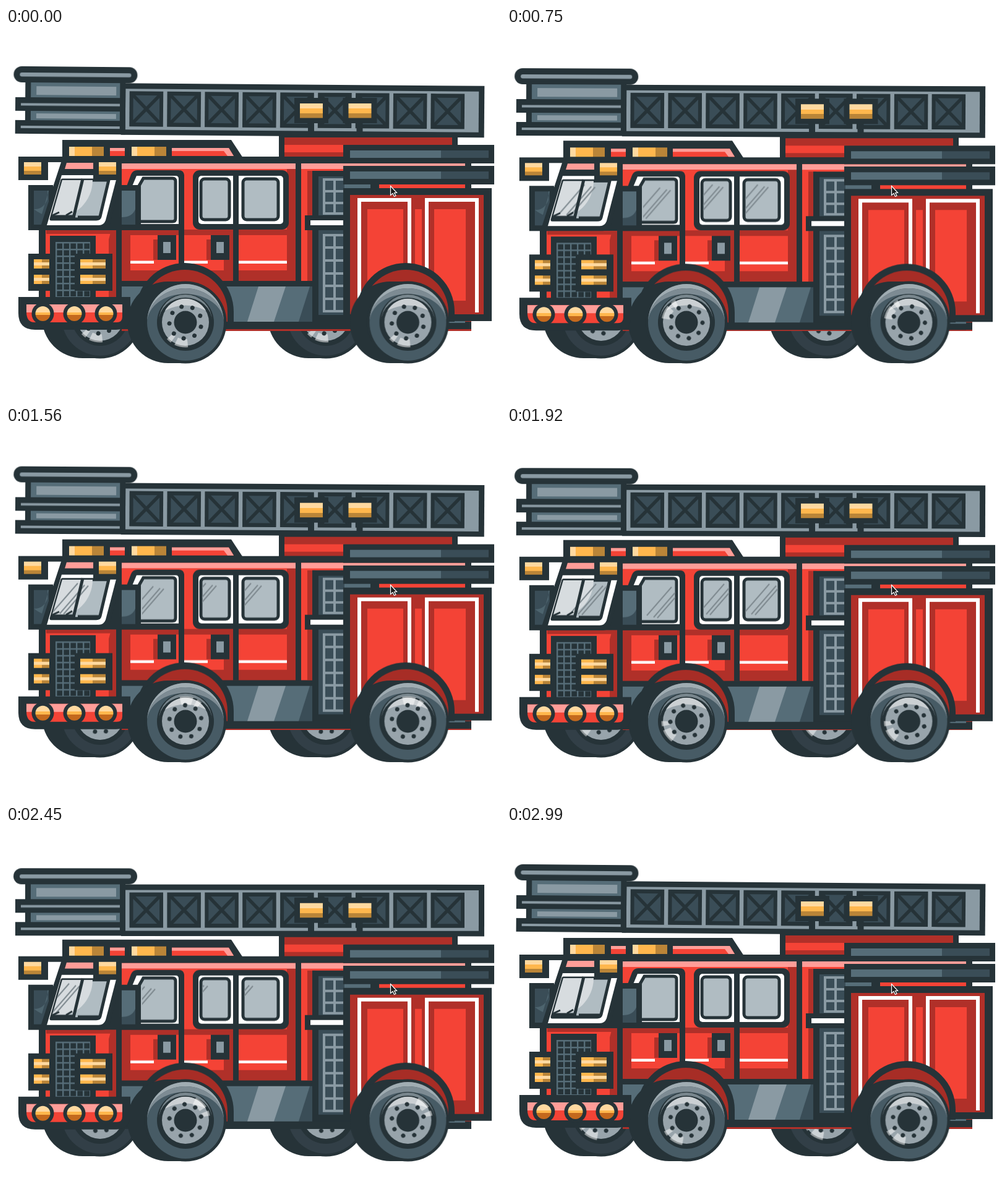
These frames come from a looping animation (800 by 600 pixels, 3.09 s). An HTML page without scripts:

```html
<!DOCTYPE html>
<html lang="en">
<head>
<meta charset="utf-8">
<title>Fire engine</title>
<style>
@property --lift { syntax: '<number>'; inherits: true; initial-value: 0; }
html, body { margin: 0; width: 100%; height: 100%; overflow: hidden; background: #fff; }
svg { display: block; width: 100vw; height: 100vh; animation: bump 3090ms ease-in-out infinite; }
.body { transform: translateY(calc(min(var(--lift), 1.3) * -3px)); }
.ladder {
  transform-origin: 773px 136px;
  transform: translateY(calc(var(--lift) * -1.2px)) rotate(calc(var(--lift) * .45deg));
}
.spin { animation: spin 3090ms linear infinite; }
.shine { animation: sweep 3090ms linear infinite; stroke: #7f8a90; stroke-width: 2; fill: none; }

.k { fill: #263338; }
.r { fill: #f44336; }
.d { fill: #b03029; }
.p { fill: #ff9d98; }
.g { fill: #8a9aa3; }
.s { fill: #566d78; }
.n { fill: #3a4d57; }
.w { fill: #fff; }
.a { fill: url(#rows); }
.glass { fill: #b0bcc2; stroke: #263338; stroke-width: 5; }

@keyframes bump {
  0%, 2.9%, 96.8%, 100% { --lift: 1; }
  7%, 15.5%, 18.4% { --lift: 0; }
  22% { --lift: 1; }
  27% { --lift: 0; }
  32.3% { --lift: 1; }
  35.9%, 38.8% { --lift: 0; }
  44% { --lift: 2.8; }
  47.3% { --lift: -.6; }
  50.5%, 53.4% { --lift: .78; }
  57.5% { --lift: 0; }
  62.1%, 65% { --lift: .4; }
  67% { --lift: 1; }
  72% { --lift: 0; }
  79.3%, 82.2% { --lift: .1; }
  86% { --lift: 1; }
  91% { --lift: 0; }
}
@keyframes spin {
  0%, 1.5% { transform: rotate(0deg); }
  98.2%, 100% { transform: rotate(-1080deg); }
}
@keyframes sweep {
  0%, 2.9%, 32.4%, 38.8%, 66.1%, 70%, 96.8%, 100% { transform: translateX(-95px); }
  12% { transform: translateX(-50px); }
  15.5%, 18.4% { transform: translateX(-38px); }
  30%, 62.1%, 65%, 94% { transform: translateX(0); }
  32.3%, 66%, 96.7% { transform: translateX(90px); }
  47% { transform: translateX(-42px); }
  50.5%, 53.4% { transform: translateX(-28px); }
  79.3%, 82.2% { transform: translateX(-42px); }
}
</style>
</head>
<body>
<svg viewBox="0 0 800 600">
<defs>
  <linearGradient id="rows" x2="0" y2="1">
    <stop offset=".36" stop-color="#ffd9a0"/><stop offset=".36" stop-color="#ffb74d"/>
    <stop offset=".68" stop-color="#ffb74d"/><stop offset=".68" stop-color="#ba8538"/>
  </linearGradient>
  <linearGradient id="cols">
    <stop offset=".16" stop-color="#ffd9a0"/><stop offset=".16" stop-color="#ffb74d"/>
    <stop offset=".66" stop-color="#ffb74d"/><stop offset=".66" stop-color="#ba8538"/>
  </linearGradient>
  <linearGradient id="halves">
    <stop offset=".5" stop-color="#ffb74d"/><stop offset=".5" stop-color="#ba8538"/>
  </linearGradient>
  <linearGradient id="bulb" x2="0" y2="1">
    <stop offset=".4" stop-color="#ffd9a0"/><stop offset=".4" stop-color="#ffb74d"/>
    <stop offset=".6" stop-color="#ffb74d"/><stop offset=".6" stop-color="#c4691d"/>
  </linearGradient>
  <pattern id="mesh" width="11" height="11" x="80" y="349" patternUnits="userSpaceOnUse">
    <path d="M0 1.2H11M1.2 0V11" stroke="#566d78" stroke-width="2.4"/>
  </pattern>
  <clipPath id="c0"><path d="M91 249H166L152 308H74Z"/></clipPath>
  <clipPath id="c1"><rect x="220" y="248" width="52" height="66" rx="4"/></clipPath>
  <clipPath id="c2"><rect x="317" y="249" width="42" height="62" rx="4"/></clipPath>
  <clipPath id="c3"><rect x="385" y="249" width="53" height="62" rx="4"/></clipPath>

  <path id="streaks" d="M-24 22L16 -24M-13 25L27 -21M-7 26L33 -20"/>
  <g id="cell">
    <rect class="k" width="54.5" height="57"/>
    <rect class="n" x="6" y="6.5" width="42.5" height="44"/>
    <path d="M6 6.5L48.5 50.5M48.5 6.5L6 50.5" stroke="#263338" stroke-width="5.5"/>
  </g>
  <g id="beacon">
    <rect class="k" x="-9" y="-9" width="55" height="41"/>
    <rect class="k" x="13" y="30" width="10" height="17"/>
    <rect class="a" width="37" height="23.5"/>
  </g>
  <g id="handle">
    <rect class="d" x="-7" y="7" width="9" height="33"/>
    <rect class="k" width="30" height="40"/>
    <rect class="g" x="9" y="11" width="12" height="18"/>
  </g>
  <g id="foglamp">
    <circle class="k" r="18"/><circle r="12" fill="url(#bulb)"/>
  </g>
  <g id="pipe">
    <rect class="k" width="244" height="30"/>
    <rect class="s" x="11" y="9" width="147" height="12"/>
    <rect class="n" x="158" y="9" width="77" height="12"/>
  </g>
  <g id="fender">
    <path class="k" d="M-79 16V0A79 79 0 0 1 79 0V16Z"/>
    <path d="M-69 16V0A69 68 0 0 1 69 0V16Z" fill="#a72d26"/>
    <path class="k" d="M-70 16V0Q-66 -36 -38 -46L-20 16Z"/>
  </g>
  <g id="wheel">
    <path class="k" d="M-28 -66H0V66H-28A66 66 0 0 1 -28 -66Z"/>
    <circle class="k" r="66.5"/>
    <circle r="62" fill="currentColor"/>
    <path d="M-62 0A62 62 0 0 1 62 0A62 55 0 0 0 -62 0Z" fill="#a0acb2"/>
    <path d="M-62 0A62 55 0 0 1 62 0A62 46 0 0 0 -62 0Z" fill="#7d8b93"/>
    <circle class="k" r="46"/>
    <path d="M-43 -2A43 43 0 0 1 43 -2A43 38 0 0 0 -43 -2Z" fill="#78868d"/>
    <circle r="38" fill="#98a4ab"/>
    <path d="M-33 -19A38 38 0 0 1 33 -19Q0 -36 -33 -19Z" fill="#cbd0d3"/>
    <circle class="k" r="18.5"/>
  </g>
  <g id="hub" fill="none">
    <circle r="34" stroke="#fff" stroke-opacity=".5" stroke-width="13" pathLength="360" stroke-dasharray="32 10 12 306" transform="rotate(84)"/>
    <circle r="26" stroke="#263338" stroke-width="7" stroke-linecap="round" pathLength="9" stroke-dasharray="0 1" transform="rotate(16)"/>
  </g>
</defs>

<g color="#323f47">
  <g transform="translate(152 468)"><use href="#wheel"/><use href="#hub" class="spin"/></g>
  <g transform="translate(517 468)"><use href="#wheel"/><use href="#hub" class="spin"/></g>
</g>
<rect class="d" x="187" y="466" width="565" height="24"/>

<g class="body">
  <!-- turret and roof lights -->
  <path class="k" d="M441 176H730V200H721V215H441Z"/>
  <rect class="d" x="450" y="180" width="271" height="13"/>
  <rect class="r" x="450" y="192" width="97" height="13"/>
  <rect class="d" x="450" y="204" width="97" height="7"/>
  <path class="k" d="M91 184H364L383 213H91Z"/>
  <rect x="102" y="195" width="56" height="15" fill="url(#cols)"/>
  <rect x="203" y="195" width="56" height="15" fill="url(#cols)"/>
  <rect class="r" x="168" y="197" width="24" height="13"/>
  <rect class="p" x="168" y="197" width="24" height="5"/>
  <path class="r" d="M268 197H360L368 210H268Z"/>
  <path class="p" d="M268 197H360L368 210H358L352 202H268Z"/>

  <!-- shell -->
  <path class="k" d="M92 211H752V266H742V490H187V445H53V330Z"/>
  <rect class="d" x="187" y="222" width="281" height="190"/>
  <rect class="p" x="187" y="222" width="281" height="9"/>
  <rect class="r" x="187" y="231" width="267" height="98"/>
  <rect class="r" x="477" y="222" width="265" height="190"/>
  <rect class="p" x="477" y="222" width="265" height="9"/>
  <path class="d" d="M487 234H500V412H487Z"/>

  <!-- cab front -->
  <rect class="k" x="36" y="257" width="40" height="73"/>
  <rect class="n" x="45" y="266" width="24" height="55"/>
  <path class="s" d="M45 296Q60 297 67 280V266H69L58 304Q50 300 45 296Z" opacity=".7"/>
  <path class="p" d="M98 221H178V231H95Z"/>
  <path class="r" d="M64 330H178V440H64Z"/>
  <path class="d" d="M170 330H178V440H166V345Z"/>
  <rect class="d" x="65" y="330" width="105" height="6"/>
  <path class="k" d="M86 231H187V246L168 320Q165 330 155 330H54Z"/>
  <path class="w" d="M90 241H180L161 314Q158 322 150 322H66Z"/>
  <path class="glass" stroke-linejoin="round" d="M91 249H166L152 308Q151 312 146 312H73Z"/>
  <g clip-path="url(#c0)">
    <circle cx="79" cy="249" r="61" fill="#d7dcdf"/>
    <g transform="translate(128 279)"><use href="#streaks" class="shine"/></g>
  </g>
  <path d="M124 247L109 310M73 308H112M116 309H150" fill="none" stroke="#263338" stroke-width="5"/>
  <path d="M75 306L86 301M97 306L107 300" stroke="#263338" stroke-width="3"/>
  <rect class="k" x="178" y="231" width="9" height="210"/>
  <rect class="k" x="71" y="339" width="74" height="104"/>
  <rect x="80" y="349" width="56" height="91" fill="url(#mesh)"/>
  <path class="k" d="M36 368H79V428H36ZM111 368H172V428H111Z"/>
  <path d="M45 377H70V392H45ZM45 402H70V417H45Z" fill="url(#halves)"/>
  <path d="M120 377H161V392H120ZM120 402H161V417H120Z" fill="url(#halves)"/>
  <path d="M45 382H70V387H45ZM45 407H70V412H45ZM120 382H161V387H120ZM120 407H161V412H120Z" fill="#ffd9a0"/>
  <path class="k" d="M20 211H100V220H68V249H20ZM141 211H187V249H141Z"/>
  <rect class="a" x="29" y="220" width="28" height="20"/>
  <rect class="a" x="150" y="220" width="28" height="20"/>

  <!-- doors -->
  <path class="r" d="M201 338H279V395H201ZM288 338H352V395H288ZM376 338H454V395H376Z"/>
  <path class="w" d="M201 379.5H239V384H201ZM288 379.5H326V384H288ZM376 379.5H454V384H376Z"/>
  <path class="k" d="M279 240H288V412H279ZM367 320H376V412H367ZM468 213H477V412H468Z"/>
  <path class="k" d="M202 240Q205 233 212 233H279Q288 233 288 242V330H187V280Z"/>
  <path class="w" d="M211 242H274Q279 242 279 247V320H200V268Z"/>
  <path class="glass" d="M222 246H269Q274 246 274 251V311Q274 316 269 316H214V260Z"/>
  <g clip-path="url(#c1)"><g transform="translate(250 284)"><use href="#streaks" class="shine"/></g></g>
  <rect class="k" x="302" y="233" width="155" height="96" rx="11"/>
  <rect class="w" x="311" y="242" width="137" height="78" rx="5"/>
  <rect class="k" x="367" y="236" width="9" height="90"/>
  <rect class="glass" x="315" y="247" width="46" height="66" rx="6"/>
  <rect class="glass" x="383" y="247" width="57" height="66" rx="6"/>
  <g clip-path="url(#c2)"><g transform="translate(335 279)"><use href="#streaks" class="shine"/></g></g>
  <g clip-path="url(#c3)"><g transform="translate(408 279)"><use href="#streaks" class="shine"/></g></g>
  <rect class="k" x="178" y="257" width="40" height="73"/>
  <rect class="n" x="187" y="266" width="22" height="55"/>
  <path class="s" d="M187 266H209V296Q204 309 187 309Z"/>
  <use href="#handle" x="245" y="338"/>
  <use href="#handle" x="331" y="338"/>

  <!-- side skirt -->
  <rect class="k" x="187" y="412" width="310" height="10"/>
  <rect class="s" x="187" y="421" width="308" height="57"/>
  <path class="g" d="M408 421H452L433 478H390Z"/>
  <path class="n" d="M491 421H495V478H473Z"/>
  <path class="k" d="M187 478H752V490H187Z"/>
  <rect class="s" x="715" y="476" width="27" height="4"/>

  <!-- equipment column -->
  <rect class="k" x="495" y="234" width="60" height="243"/>
  <path class="n" d="M505 243H547V306H505ZM505 330H547V467H505Z"/>
  <path d="M514 246V305M531 246V305M512 248H547M512 267H547M512 286H547M512 303H547M514 336V463M531 336V463M512 338H547M512 358H547M512 379H547M512 400H547M512 420H547M512 441H547M512 461H547" stroke="#8a9aa3" stroke-width="4"/>
  <rect class="k" x="483" y="306" width="70" height="24"/>
  <rect class="w" x="492" y="314" width="55" height="8"/>

  <!-- rear locker -->
  <rect class="k" x="547" y="252" width="205" height="14"/>
  <rect class="s" x="547" y="255" width="42" height="7"/>
  <rect class="r" x="603" y="255" width="139" height="7"/>
  <rect class="k" x="545" y="262" width="240" height="215"/>
  <rect class="d" x="556" y="273" width="216" height="193"/>
  <path class="r" d="M584 296H642V460H584ZM661 296H672V460H661ZM692 296H743V444H692ZM568 300H574V466H568Z"/>
  <path d="M571 466V281H652V440M680 440V281H761V463" fill="none" stroke="#fff" stroke-width="6"/>
  <use href="#pipe" x="545" y="192"/>
  <use href="#pipe" x="545" y="226"/>
  <use href="#fender" x="289" y="462"/>
  <use href="#fender" x="646" y="462"/>
</g>

<g class="ladder">
  <rect class="k" x="186" y="95" width="587" height="83.5"/>
  <rect class="g" x="193" y="104" width="571" height="66"/>
  <use href="#cell" x="199.5" y="108"/><use href="#cell" x="260.4" y="108"/>
  <use href="#cell" x="321.3" y="108"/><use href="#cell" x="382.2" y="108"/>
  <use href="#cell" x="443.1" y="108"/><use href="#cell" x="504" y="108"/>
  <use href="#cell" x="564.9" y="108"/><use href="#cell" x="625.8" y="108"/>
  <use href="#cell" x="686.5" y="108"/>
  <path class="k" d="M31 90H193V178H15V156H31V141H15V119H31Z"/>
  <path class="s" d="M40 95H184V119H40ZM40 141H184V156H40Z"/>
  <path class="g" d="M49 101H178V115H49ZM49 145H178V153H49ZM24 128.5H184V132.5H24ZM24 165H184V169H24Z"/>
  <rect class="k" x="12" y="69" width="200" height="26" rx="13"/>
  <rect class="g" x="22" y="79" width="180" height="6.5" rx="3.2"/>
</g>

<g class="body">
  <use href="#beacon" x="475" y="125"/>
  <use href="#beacon" x="553.5" y="125"/>
</g>

<g color="#475b65">
  <g transform="translate(290 476)"><use href="#wheel"/><use href="#hub" class="spin"/></g>
  <g transform="translate(649.5 476)"><use href="#wheel"/><use href="#hub" class="spin"/></g>
</g>

<g class="body">
  <path class="k" d="M20 438H201V466Q201 491 178 491H47Q20 491 20 464Z"/>
  <path class="r" d="M33 450H188V470Q188 479 179 479H46Q33 479 33 462Z"/>
  <path class="p" d="M33 450H188V463H33Z"/>
  <use href="#foglamp" x="59.5" y="465"/>
  <use href="#foglamp" x="110.5" y="465"/>
  <use href="#foglamp" x="161.5" y="465"/>
</g>

<path d="M621.5 255.5V270.5L625 267.5L627.5 272.5L630 271.3L627.6 266.5H631.5Z" fill="#1c1c1c" stroke="#fff" stroke-width="1.2"/>
</svg>
</body>
</html>
```
